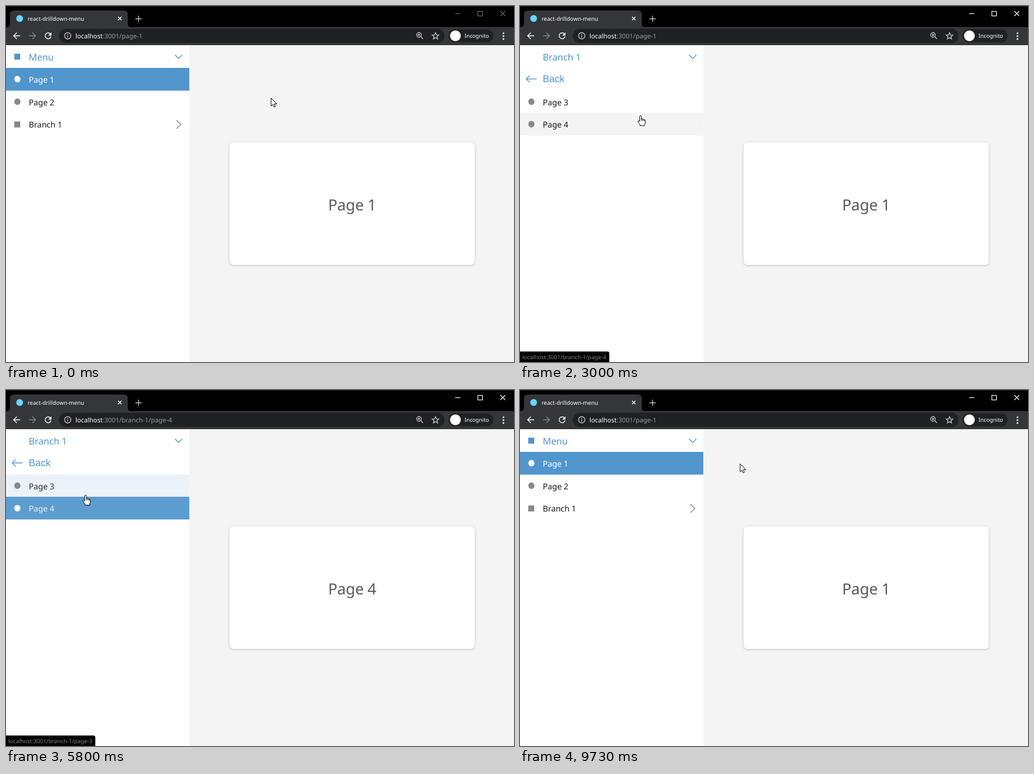
An HTML page that plays this animation: 893x627 px, repeating every 9.79 s.

```html
<!DOCTYPE html>
<html lang="en">
<head>
<meta charset="utf-8">
<title>react-drilldown-menu</title>
<style>
  html, body { margin: 0; width: 100%; height: 100%; overflow: hidden; background: #f4f4f4; }
  svg { display: block; }
  text { font-family: "Noto Sans", sans-serif; text-rendering: geometricPrecision; white-space: pre; }
  .line { fill: none; stroke-width: 1.4; }
  .white { stroke: #fff; }
  .soft { stroke: #c4c6c9; }
  .blue { stroke: #4f96cd; }
  .head { font-size: 16.2px; fill: #4f96cd; }
  .item { font-size: 14.3px; letter-spacing: -.1px; }
  .back { font: 17.3px "Liberation Sans", sans-serif; fill: #4f96cd; }
  .title { font-size: 27px; fill: #595863; text-anchor: middle; letter-spacing: -.2px; }
  .card { fill: #fff; filter: drop-shadow(0 1px 2px rgba(0, 0, 0, .22)); }
  .cursor { fill: #fff; stroke: #000; stroke-width: 1; stroke-linejoin: round; }
</style>
</head>
<body>
<svg width="893" height="627" viewBox="0 0 893 627">
  <defs><clipPath id="side"><rect y="69" width="322.5" height="558"/></clipPath></defs>

  <!-- page -->
  <rect y="69" width="893" height="558" fill="#f4f4f4"/>
  <rect class="card" x="393" y="240" width="431" height="216" rx="7"/>
  <text class="title" id="title" x="608.5" y="360"></text>

  <!-- menu -->
  <rect y="69" width="322.5" height="558" fill="#fff"/>
  <g clip-path="url(#side)">
    <g id="root">
      <rect x="14.5" y="84" width="10.5" height="10.5" fill="#4f96cd"/>
      <text class="head" x="40" y="96">Menu</text>
    </g>
    <g id="branch">
      <text class="head" x="40" y="96">Branch 1</text>
      <path class="line blue" d="M29 128.500H11M17 122.500l-6 6 6 6"/>
      <text class="back" x="40" y="134">Back</text>
    </g>
  </g>
  <path class="line blue" d="M297 86l6.500 6.500 6.500-6.500"/>

  <!-- browser -->
  <rect width="893" height="38" fill="#000"/>
  <rect width="893" height="1" fill="#222"/>
  <path d="M0 37H2Q7 37 7 31V15Q7 8 14 8H207Q214 8 214 15V31Q214 37 219 37H893V69H0Z" fill="#353639"/>
  <circle cx="24" cy="22" r="6" fill="#61dafb"/>
  <text x="38" y="26" font-size="9.8" font-weight="500" fill="#fff">react-drilldown-menu</text>
  <path class="line white" d="M197 19l6 6M203 19l-6 6"/>
  <path class="line soft" d="M227.500 22.500h11M233 17v11"/>
  <g id="controls" fill="none" stroke-width="1.2">
    <path d="M789.500 13.500h9"/>
    <rect x="829.500" y="9.500" width="8" height="8"/>
    <path d="M869 9l8.500 8.500M877.500 9l-8.500 8.500"/>
  </g>
  <rect x="93" y="40" width="678" height="25" rx="12.500" fill="#202124"/>
  <rect x="778" y="41" width="79" height="23" rx="11.500" fill="#202124"/>
  <path class="line white" d="M25 52.500H14M19 47l-5.500 5.500 5.500 5.500"/>
  <path class="line" stroke="#85878a" d="M40.500 52.500h11M46.500 47l5.500 5.500-5.500 5.500"/>
  <path class="line white" d="M78 49a5.200 5.200 0 1 0 1.200 4.500"/>
  <path d="M79.800 46.500v5.500h-5.500z" fill="#fff"/>
  <circle class="line soft" cx="108.500" cy="52.500" r="5.500"/>
  <path class="line soft" d="M108.500 51.500v4M108.500 49v1.300"/>
  <text x="122" y="57" font-size="11.35" fill="#fff">localhost<tspan id="url" fill="#979a9e"></tspan></text>
  <circle class="line soft" cx="726" cy="51" r="4"/>
  <path class="line soft" d="M729 54l4 4M724 51h4M726 49v4"/>
  <path class="line soft" d="M755 47l1.600 3.900 4.200.3-3.200 2.700 1 4.100-3.600-2.200-3.600 2.200 1-4.100-3.200-2.700 4.200-.3z"/>
  <circle cx="790" cy="52.500" r="9.500" fill="#fff"/>
  <text x="806" y="56" font-size="9.6" font-weight="500" fill="#fff">Incognito</text>
  <g fill="#fff">
    <circle cx="874.500" cy="48" r="1.500"/><circle cx="874.500" cy="53" r="1.500"/><circle cx="874.500" cy="58" r="1.500"/>
  </g>

  <g id="status">
    <path id="statusBox" fill="#000"/>
    <text id="statusText" x="4" y="622" font-size="9.9" fill="#8a8681"></text>
  </g>

  <g id="cursor" class="cursor">
    <path id="arrow" d="M0 0V14.200L3.200 11.300 5.400 16 7.500 15 5.500 10.400H10Z"/>
    <g id="hand">
      <path d="M-1.500 10V1.300Q-1.500 0 0 0T1.500 1.300V6Q3.400 5 4.100 6.500Q5.900 5.800 6.400 7.300Q8.300 7 8.300 8.800V12Q8.300 14 7 16V17.800H-1V16L-4.600 11.200Q-5 9 -3.200 9.200Z"/>
      <path d="M1.500 6V9.500M4.100 6.500V9.500M6.400 7.300V10" fill="none"/>
    </g>
  </g>
</svg>

<script>
const LOOP = 9790, WIDTH = 322.5, TOP = 109, PITCH = 39.7, FOCUS = 330;
const WHITE = [255, 255, 255], GREY = [244, 244, 244], BLUE = [80, 150, 205], INK = [26, 24, 34];
const OFF = [0], ON = [1];
const MENU = { root: ["Page 1", "Page 2", "Branch 1"], branch: ["Back", "Page 3", "Page 4"] };

// The pointer's stops; it rests for `stay` ms and may click `click` ms after arriving
const STOPS = [
  { at: 0, x: 466, y: 162 },
  { at: 130, x: 454, y: 229, stay: 200 },
  { at: 1000, x: 215, y: 173, stay: 600, click: 400 },
  { at: 1800, x: 211, y: 130, stay: 300, click: 220 },
  { at: 2270, x: 219, y: 204, stay: 500, click: 180 },
  { at: 3330, x: 203, y: 178, stay: 600, click: 330 },
  { at: 4200, x: 300, y: 12 },
  { at: 4530, x: 745, y: 150 },
  { at: 4750, x: 640, y: 338 },
  { at: 5280, x: 56, y: 50 },
  { at: 5350, x: 139, y: 208, stay: 300, click: 250 },
  { at: 5900, x: 141, y: 170, stay: 230, click: 190 },
  { at: 6330, x: 146, y: 132, stay: 500, click: 190 },
  { at: 7670, x: 188, y: 145, stay: 530, click: 170 },
  { at: 8600, x: 236, y: 36 },
  { at: 9200, x: 386, y: 120, stay: 300 },
  { at: 9730, x: 387, y: 130 }
];

const $ = id => document.getElementById(id);
const clamp = x => Math.min(1, Math.max(0, x));
const lerp = (a, b, k) => a + (b - a) * k;
const mix = (a, b, k) => a.map((v, i) => lerp(v, b[i], k));
const rgb = c => `rgb(${c.map(Math.round)})`;
const isPage = label => /^Page/.test(label);
const address = label => (label > "Page 2" ? "branch-1/" : "") + label.toLowerCase().replace(" ", "-");

// CSS "ease": cubic-bezier(.25, .1, .25, 1)
function ease(x) {
  const curve = (a, b, u) => 3 * a * u * (1 - u) ** 2 + 3 * b * u * u * (1 - u) + u ** 3;
  let lo = 0, hi = 1;
  for (let i = 0; i < 18; i++) {
    const mid = (lo + hi) / 2;
    if (curve(.25, .25, mid) < x) lo = mid; else hi = mid;
  }
  return curve(.1, 1, lo);
}

// A log holds [time, value] for each change of a value
const newLog = value => [[0, value]];
const note = (log, t, value) => { if (log.at(-1)[1] !== value) log.push([t, value]); };
const valueAt = (log, t) => log.findLast(([at]) => at <= t)[1];

// Like a CSS transition: each change starts from wherever the last one had got to
function follow(log, t, duration) {
  let value = log[0][1];
  log.forEach(([at, target], i) => {
    if (t < at) return;
    const end = Math.min(t, log[i + 1]?.[0] ?? LOOP);
    value = mix(value, target, ease(clamp((end - at) / duration)));
  });
  return value;
}

function pointer(t) {
  const next = STOPS.findIndex(s => s.at > t);
  if (next < 0) return STOPS.at(-1);
  const a = STOPS[next - 1], b = STOPS[next], leave = a.at + (a.stay ?? 0);
  const k = clamp((t - leave) / (b.at - leave));
  return { x: lerp(a.x, b.x, k), y: lerp(a.y, b.y, k) };
}

const under = ({ x, y }, panel) => x < WIDTH ? MENU[panel][Math.floor((y - TOP) / PITCH)] : undefined;

function add(parent, tag, attrs, text = "") {
  const el = document.createElementNS("http://www.w3.org/2000/svg", tag);
  for (const k in attrs) el.setAttribute(k, attrs[k]);
  el.textContent = text;
  return parent.appendChild(el);
}

function makeRow(panel, slot) {
  const label = MENU[panel][slot], g = $(panel), mid = 129 + slot * PITCH;
  const top = Math.round(TOP + slot * PITCH), bottom = Math.round(TOP + (slot + 1) * PITCH);
  const row = { label, fill: newLog(WHITE), ink: newLog(INK), push: newLog(OFF) };
  row.box = add(g, "rect", { y: top, width: WIDTH, height: bottom - top });
  if (isPage(label)) {
    row.mark = add(g, "ellipse", { cx: 20, cy: mid - .2, rx: 5.4, ry: 5.8 });
  } else {
    row.mark = add(g, "rect", { x: 14.5, y: mid - 5, width: 10.5, height: 10.5 });
    row.chevron = add(g, "path", { class: "line", stroke: "#888", d: `M299.500 ${mid - 7.5}l8 7.500-8 7.500` });
  }
  row.text = add(g, "text", { class: "item", x: 40, y: mid + 6 }, label);
  return row;
}

const rows = [];
for (const panel in MENU)
  MENU[panel].forEach((label, slot) => { if (label !== "Back") rows.push(makeRow(panel, slot)); });

// Run through the session once, noting what pointer and clicks bring about
const pages = newLog("Page 1"), panels = newLog("root"), slide = newLog(OFF);
const links = newLog("Page 1"), shown = newLog(OFF);
const clicks = STOPS.filter(s => s.click).map(s => s.at + s.click);
rows[0].fill = newLog(BLUE);
rows[0].ink = newLog(WHITE);

let linked = false, since = 0;
for (let t = 0; t < LOOP; t += 5) {
  const pos = pointer(t);
  if (clicks.includes(t)) {
    const label = under(pos, panels.at(-1)[1]);
    if (isPage(label)) note(pages, t, label);
    else note(panels, t, label === "Back" ? "root" : "branch");
    note(slide, t, panels.at(-1)[1] === "branch" ? ON : OFF);
  }
  const page = pages.at(-1)[1], hover = under(pos, panels.at(-1)[1]);
  for (const row of rows) {
    const active = row.label === page, over = row.label === hover;
    note(row.fill, t, active ? BLUE : over ? GREY : WHITE);
    note(row.ink, t, active ? WHITE : INK);
    note(row.push, t, over ? ON : OFF);
  }
  // The link bubble appears after 80 ms and lingers for 250 ms
  if (isPage(hover)) note(links, t, hover);
  if (isPage(hover) !== linked) { linked = !linked; since = t; }
  if (t - since >= (linked ? 80 : 250)) note(shown, t, linked ? ON : OFF);
}

function draw(t) {
  const page = valueAt(pages, t), panel = valueAt(panels, t);
  for (const row of rows) {
    row.box.setAttribute("fill", rgb(follow(row.fill, t, 300)));
    row.text.setAttribute("fill", rgb(follow(row.ink, t, 300)));
    row.mark.setAttribute("fill", row.label === page ? "#fff" : "#888");
    row.chevron?.setAttribute("transform", `translate(${3 * follow(row.push, t, 150)[0]})`);
  }

  const shift = WIDTH * follow(slide, t, 400)[0];
  $("root").setAttribute("transform", `translate(${-shift})`);
  $("branch").setAttribute("transform", `translate(${WIDTH - shift})`);

  $("url").textContent = ":3001/" + address(page);
  $("title").textContent = page;
  $("controls").setAttribute("stroke", t < FOCUS ? "#6a6a6a" : "#fff");

  const link = "localhost:3001/" + address(valueAt(links, t)), w = 5 * link.length + 7;
  $("statusBox").setAttribute("d", `M0 608.500H${w - 3}Q${w} 608.500 ${w} 612V627H0Z`);
  $("statusText").textContent = link;
  $("status").setAttribute("opacity", follow(shown, t, 150)[0]);

  const pos = pointer(t), pointing = under(pos, panel);
  $("cursor").setAttribute("transform", `translate(${Math.round(pos.x)} ${Math.round(pos.y)})`);
  $("hand").setAttribute("visibility", pointing ? "visible" : "hidden");
  $("arrow").setAttribute("visibility", pointing ? "hidden" : "visible");
}

let begin;
function tick(now) {
  begin ??= now;
  draw((now - begin) % LOOP);
  requestAnimationFrame(tick);
}
draw(0);
requestAnimationFrame(tick);
</script>
</body>
</html>
```
